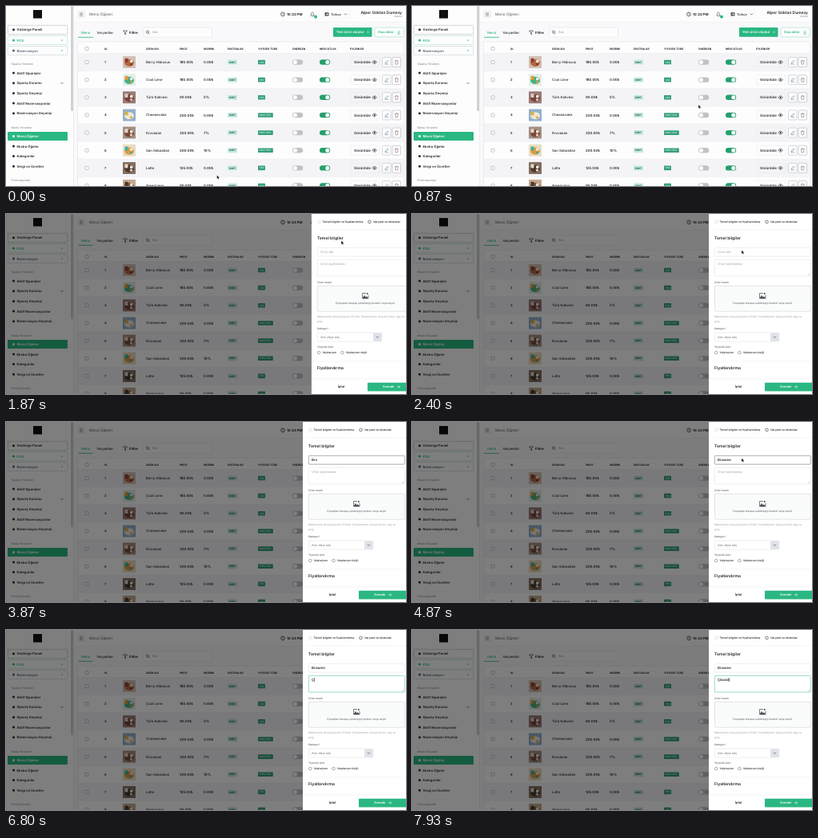
These frames come from a looping animation (500 px wide and 226 px high, 8 s). An HTML page:

```html
<!DOCTYPE html>
<html lang="tr">
<head>
<meta charset="utf-8">
<style>
html, body { margin: 0; width: 100%; height: 100%; overflow: hidden; background: #fff; }
svg { display: block; width: 100vw; height: 100vh; font-family: Inter, "Noto Sans", sans-serif; text-rendering: geometricPrecision; }
</style>
</head>
<body>
<svg id="stage" viewBox="0 0 500 226"></svg>
<script>
const GREEN = '#2ab782', INK = '#24272b', GREY = '#8b9097', LINE = '#dcdde2';

// Markup helpers; text is centred vertically on y.
const text = (x, y, size, str, fill = INK, weight = 400, extra = '') =>
  `<text x="${x}" y="${y + size * .36}" font-size="${size}" fill="${fill}" font-weight="${weight}" ${extra}>${str}</text>`;
const rect = (x, y, w, h, fill = 'none', stroke = 'none', r = 1, extra = '') =>
  `<rect x="${x}" y="${y}" width="${w}" height="${h}" rx="${r}" fill="${fill}" stroke="${stroke}" stroke-width=".5" ${extra}/>`;
const path = (d, stroke = INK, width = .6, fill = 'none', extra = '') =>
  `<path d="${d}" stroke="${stroke}" stroke-width="${width}" fill="${fill}" ${extra}/>`;
const circle = (x, y, r, fill = 'none', stroke = 'none', width = .6) =>
  `<circle cx="${x}" cy="${y}" r="${r}" fill="${fill}" stroke="${stroke}" stroke-width="${width}"/>`;
const chevron = (x, y, color = INK) => path(`M${x - 1.5} ${y - .7}l1.5 1.5 1.5-1.5`, color);

function sidebar() {
  const item = (y, label, fill = INK) => circle(9.5, y, 1.5, fill) + text(13.5, y, 4.2, label, fill, 600);
  const group = (y, label) => text(6.5, y, 3.6, label, GREY, 500);
  const dashes = 'stroke-dasharray="1 .7"';
  let s = rect(0, 0, 84.5, 226, '#fdfdfe', 'none', 0) + rect(34, 5, 11, 10.5, '#111', 'none', 0);
  s += rect(2.3, 24.3, 74.5, 11.2, 'none', '#777', 1, dashes) + item(29.8, 'Gösterge Paneli');
  s += rect(2.3, 37.5, 74.5, 11, 'none', '#63c29b', 1, dashes) + item(43, 'POS', GREEN);
  s += rect(2.3, 50.5, 74.5, 11, 'none', '#8fa0a8', 1, dashes) + item(56, 'Rezervasyon', '#4d6274');
  s += path('M69 43h2M70 42v2M69 56h2M70 55v2', GREEN, .5);
  s += group(73, 'Sipariş Yönetimi');
  ['Aktif Siparişler', 'Sipariş Durumu', 'Sipariş Geçmişi', 'Aktif Rezervasyonlar', 'Rezervasyon Geçmişi']
    .forEach((label, i) => s += item(84 + i * 12.7, label));
  s += chevron(70, 96.8) + group(153, 'Menü Yönetimi');
  s += rect(2, 158, 75, 11, GREEN) + item(163.4, 'Menü Öğeleri', '#fff');
  ['Ekstra Öğeler', 'Kategoriler', 'Vergi ve Ücretler'].forEach((label, i) => s += item(176 + i * 12.6, label));
  s += group(219, 'Promosyonlar');
  return s + rect(81.3, 0, 2.4, 132, '#c8c8cc', 'none', 1.2) + path('M84.5 0V226', LINE, .5);
}

function header() {
  let s = rect(84.5, 0, 416, 20, '#fdfdfe', 'none', 0) + path('M84.5 20H500', '#e8e8ec', .5);
  s += rect(89, 5.5, 10, 10, '#f3f3f6') + path('M92 8.8h4M92 10.5h4M92 12.2h4', '#555', .5);
  s += text(104, 10.2, 4.65, 'Menü Öğeleri', '#55585d');
  s += circle(346, 10.3, 2.4, 'none', INK, .7) + path('M346 8.8v1.7l1.1.7', INK, .5);
  s += `<g id="clock">${text(351, 10.3, 4.3, '10:22 PM', INK, 700)}</g>`;
  s += path('M380.8 12h4.4l-.7-1V9.5a1.5 1.5 0 0 0-3 0V11zM382.3 13h1.4', '#555', .6) + circle(387, 13.6, 2, GREEN);
  s += rect(395, 5, 34, 11, 'none', '#ededf0') + rect(398.5, 8, 5, 4.6, '#55585e', 'none', .5) + circle(401.5, 10.2, 1, '#fff');
  s += text(406, 10.3, 3.9, 'Türkçe', INK, 500) + chevron(424.5, 10.3);
  s += text(495, 7.8, 4.9, 'Alper Göktan Dumsoy', INK, 600, 'text-anchor="end"');
  return s + text(495, 13, 3.2, 'Admin', GREY, 500, 'text-anchor="end"');
}

function toolbar() {
  let s = text(94, 33, 4.2, 'Menü', GREEN, 500) + path('M90 39.3h19', GREEN, .8) + text(113.5, 33, 4.2, 'Varyantlar', INK, 500);
  s += path('M146.5 31h5l-2 2.4v2.4l-1-.6v-1.8z', INK, .6) + text(154, 33, 4.3, 'Filtre', INK, 700);
  s += rect(172, 27, 85.5, 12, '#fdfdfe', LINE) + circle(177, 32.6, 1.6, 'none', INK) + path('M178.2 33.8l1.3 1.3');
  s += text(183, 33, 4, 'Ara', GREY);
  s += rect(409, 27, 48.5, 11.8, GREEN) + text(413, 32.9, 4.2, 'Yeni ürün oluştur', '#fff', 600);
  s += path('M451.3 32.8h2.4M452.5 31.6v2.4', '#dff5ec', .5);
  s += rect(461, 27, 36.5, 11.8, '#fdfdfe', '#8fd8b8', 2) + text(465, 32.9, 4, 'Dışa aktar', GREEN, 600);
  return s + path('M491 30.6v3.2m-1.3-1.2l1.3 1.3 1.3-1.3M489 35.2h4', GREEN, .6);
}

function photo(y, [plate, food, accent]) {
  return rect(146, y - 7.5, 16, 15, plate, 'none', .6)
    + `<ellipse cx="154" cy="${y + .8}" rx="6" ry="4.6" fill="${food}"/>`
    + rect(148.5, y - 4.8, 4, 5, accent, 'none', 1) + rect(155, y - 3, 3.5, 3.5, '#f2e8dc', 'none', 1)
    + circle(156.5, y + 2.8, 1.6, accent);
}

function table() {
  const heads = [[123, 'SL'], [175, 'ÜRÜN ADI'], [217, 'PRICE'], [247, 'İNDİRİM'], [277, 'EKSTRALAR'], [315, 'YİYECEK TÜRÜ'],
    [358, 'ÖNERİLEN'], [392, 'MEVCUTLUK'], [430, 'EYLEMLER']];
  const rows = [
    ['Berry Hibiscus', 185, '0.00₺', 1, ['#d3c0b2', '#b06a45', '#8f3a2c']],
    ['Cool Lime', 185, '0.00₺', 1, ['#e4eee6', '#43b189', '#e89a35']],
    ['Türk Kahvesi', 90, '5%', 1, ['#9a7a74', '#7a423a', '#d9cbc4']],
    ['Cheesecake', 200, '0.00₺', 0, ['#8fb0cf', '#f0e6cf', '#d8b04c']],
    ['Kruvasan', 320, '7%', 0, ['#a39084', '#7a4a36', '#e6d5c6']],
    ['San Sebastian', 200, '10%', 0, ['#e9dcc0', '#e09a45', '#3fb09a']],
    ['Latte', 125, '0.00₺', 1, ['#85705f', '#4b392d', '#e3d9cd']],
    ['Americano', 95, '0.00₺', 1, ['#c4a98f', '#7d5a40', '#4a352a']]];
  const box = y => rect(99, y - 2, 4, 4, '#fff', '#8a8f95', .6);
  let s = rect(89.5, 45, 408, 190, '#fdfdfe', LINE) + box(53.5);
  heads.forEach(([x, label]) => s += text(x, 53.5, 3.25, label, INK, 700));
  rows.forEach(([name, price, cut, veg, colors], i) => {
    const y = 70.5 + i * 22.15, tag = veg ? 'VEG' : 'NON-VEG';
    s += rect(90, y - 11, 407, 22.1, i % 2 ? '#fdfdfe' : '#f4f4f7', 'none', 0) + path(`M90 ${y - 11}h407`, '#e6e6ea', .4);
    s += box(y) + text(123, y, 4.1, i + 1, INK, 600) + photo(y, colors) + text(175, y, 4.3, name, INK, 500);
    s += text(217, y, 4.35, price + '.00₺', INK, 600) + text(247, y, 4.35, cut, INK, 600);
    s += rect(277, y - 3, 12, 6, '#c5e9e2', 'none', .6) + text(283, y, 3.1, 'EVET', '#124f3c', 700, 'text-anchor="middle"');
    s += rect(315, y - 2.8, veg ? 9 : 18.8, 5.6, '#359e79', 'none', .6) + text(316.6, y, 3, tag, '#cdf0e2', 600);
    s += rect(358, y - 3.2, 13.2, 6.4, '#c2c2c6', 'none', 3.2) + circle(361.4, y, 2.5, '#fff');
    s += rect(392, y - 3.2, 13.2, 6.4, '#249f6b', 'none', 3.2) + circle(401.8, y, 2.5, '#fff');
    s += rect(431, y - 6, 36, 12, 'none', '#e6e6ea') + text(435, y, 4.35, 'Görüntüle', INK, 600);
    s += path(`M457.8 ${y}q2.8-4 5.6 0q-2.8 4-5.6 0z`) + circle(460.6, y, 1, INK);
    s += rect(470.5, y - 6, 10.5, 12, '#fdfdfe', '#a9b6bc') + path(`M474 ${y + 1.8}l.3-1.4 2.6-2.6 1.1 1.1-2.6 2.6zM473.6 ${y + 2.6}h4.6`, '#5b7686', .5);
    s += rect(483, y - 6, 10.5, 12, '#fdfdfe', '#a5a6ac') + path(`M486 ${y - 1.6}h4.5M487.4 ${y - 2.4}h1.7M486.6 ${y - 1.6}l.3 4.2h2.7l.3-4.2`, '#77585c', .5);
  });
  return s;
}

function drawer() {
  let s = rect(371, -1, 135, 228, '#fff', 'none', 0);
  s += circle(380.5, 9.8, 1.8, 'none', '#d3d6da') + text(384.5, 9.8, 3.55, 'Temel bilgiler ve fiyatlandırma', INK, 500);
  s += circle(443.5, 9.8, 1.8, 'none', INK) + text(448, 9.8, 3.55, 'Varyant ve ekstralar', INK, 500);
  s += path('M378 19.5H500M378 185H500M371 207H500', '#e8eaec', .5);
  s += text(378, 30, 5.1, 'Temel bilgiler', INK, 600);
  s += rect(378.3, 42.3, 120, 10.8, '#fff', LINE, 1, 'id="nameBox"') + '<g id="name"></g>';
  s += rect(378.3, 57.3, 120, 20.8, '#fff', LINE, 1, 'id="noteBox"') + '<g id="note"></g>';
  s += path('M494.5 77l2.5-2.5M496 77l1-1', GREY, .4);
  s += text(378, 85.5, 3.5, 'Ürün resmi', '#4c5157');
  s += rect(378.3, 90.3, 120, 32, '#fafbfb', '#9fa4aa', 1, 'stroke-dasharray="1.2 .8"');
  s += path('M434.5 106l2.5-4 1.8 2.4 1-1.2 2.2 2.8z', 'none', 0, '#434a52') + path('M434.5 99.5v6.5h7.5v-4M434.5 99.5h4.5', '#434a52', .7) + circle(440.8, 100, 1, '#434a52');
  s += text(438.2, 112, 3.4, 'Dosyaları buraya sürükleyip bırakın veya seçin', '#565c63', 400, 'text-anchor="middle"');
  s += text(378, 129, 3.5, 'Maksimum dosya boyutu 500kb. Desteklenen dosya türleri: jpg ve', '#a0a5ab') + text(378, 134.3, 3.5, 'png.', '#a0a5ab');
  s += text(378, 144, 3.45, 'Kategori', '#4c5157') + rect(378.3, 149, 80.5, 11, '#fff', LINE) + text(382, 154.4, 4, 'Ara veya seç', '#73797f');
  s += rect(448, 149.2, 10.6, 10.6, '#dfe3e9', 'none', .8) + chevron(453.4, 154.5);
  s += text(378, 166.5, 3.45, 'Yiyecek türü', '#4c5157');
  s += circle(380.2, 174, 1.8, '#fff', '#777') + text(384.5, 174, 3.4, 'Vejetaryen', INK, 500);
  s += circle(409.5, 174, 1.8, '#fff', '#777') + text(414, 174, 3.4, 'Vejetaryen değil', INK, 500);
  s += text(378, 193.5, 5, 'Fiyatlandırma', INK, 600);
  s += text(408, 217, 4, 'İptal', INK, 600, 'text-anchor="middle"');
  return s + rect(441, 211.8, 62, 10.8, GREEN) + text(460, 217, 3.9, 'Sonraki', '#fff', 600) + path('M478 217h3.6m-1.4-1.4l1.4 1.4-1.4 1.4', '#fff', .6);
}

const stage = document.getElementById('stage');
stage.innerHTML = rect(0, 0, 500, 226, '#f9f9fb', 'none', 0) + table() + header() + toolbar() + sidebar()
  + rect(0, 0, 500, 226, '#000', 'none', 0, 'id="dim"') + `<g id="drawer">${drawer()}</g>`
  + `<g id="pointer">${path('M0 0v4.6l1.1-1 .7 1.6.9-.4-.7-1.5h1.5z', '#fff', .35, '#000')}</g>`;
const $ = id => document.getElementById(id);

const ease = (t, from, to) => {
  const u = Math.min(1, Math.max(0, (t - from) / (to - from)));
  return u * u * (3 - 2 * u);
};

// Pointer moves: start, end, x, y
const moves = [[70, 600, 358, 124], [880, 1440, 420, 32], [1740, 2350, 412, 45.5], [4870, 5600, 398, 64.5]];
const nameTimes = [3470, 3600, 3730, 4000, 4270, 4530, 4670];
const noteTimes = [6800, 6930, 7070, 7270, 7470, 7670, 7870];
const typed = (word, times, t) => word.slice(0, times.filter(k => k <= t).length);

function setField(id, y, value, hint, caret) {
  const g = $(id);
  g.innerHTML = text(382, y, value ? 4.35 : 4.1, value || hint, value ? '#111' : '#a0a5ab', value ? 500 : 400);
  if (!caret) return;
  const x = 382.3 + (value ? g.firstChild.getComputedTextLength() : 0);
  g.innerHTML += path(`M${x} ${y - 2.6}v5.2`, '#111', .5);
}

function draw(t) {
  let x = 263.6, y = 212.5;
  for (const [from, to, nx, ny] of moves) {
    const k = ease(t, from, to);
    x += (nx - x) * k;
    y += (ny - y) * k;
  }
  $('pointer').setAttribute('transform', `translate(${x} ${y})`);
  $('pointer').setAttribute('visibility', t >= 3470 && t < 4870 || t >= 6800 ? 'hidden' : 'visible');
  $('clock').firstChild.textContent = t < 1600 ? '10:22 PM' : '10:23 PM';
  $('dim').setAttribute('opacity', .5 * ease(t, 1490, 1790));
  $('drawer').setAttribute('transform', `translate(${129 * (1 - ease(t, 1600, 1930))} 0)`);

  const inName = t >= 2600 && t < 5670, inNote = t >= 5670;
  $('nameBox').setAttribute('stroke', inName ? '#565b60' : LINE);
  $('noteBox').setAttribute('stroke', inNote ? '#2fb98c' : LINE);
  setField('name', 47.6, typed('Brownie', nameTimes, t), 'Ürün adı', inName && t > 4130 && t < 4870);
  setField('note', 62.6, typed('Çikolat', noteTimes, t), 'Ürün açıklaması', inNote && !(t >= 6130 && t < 6530));
}

function frame(now) {
  draw(now % 8000);
  requestAnimationFrame(frame);
}
draw(0);
requestAnimationFrame(frame);
</script>
</body>
</html>
```
